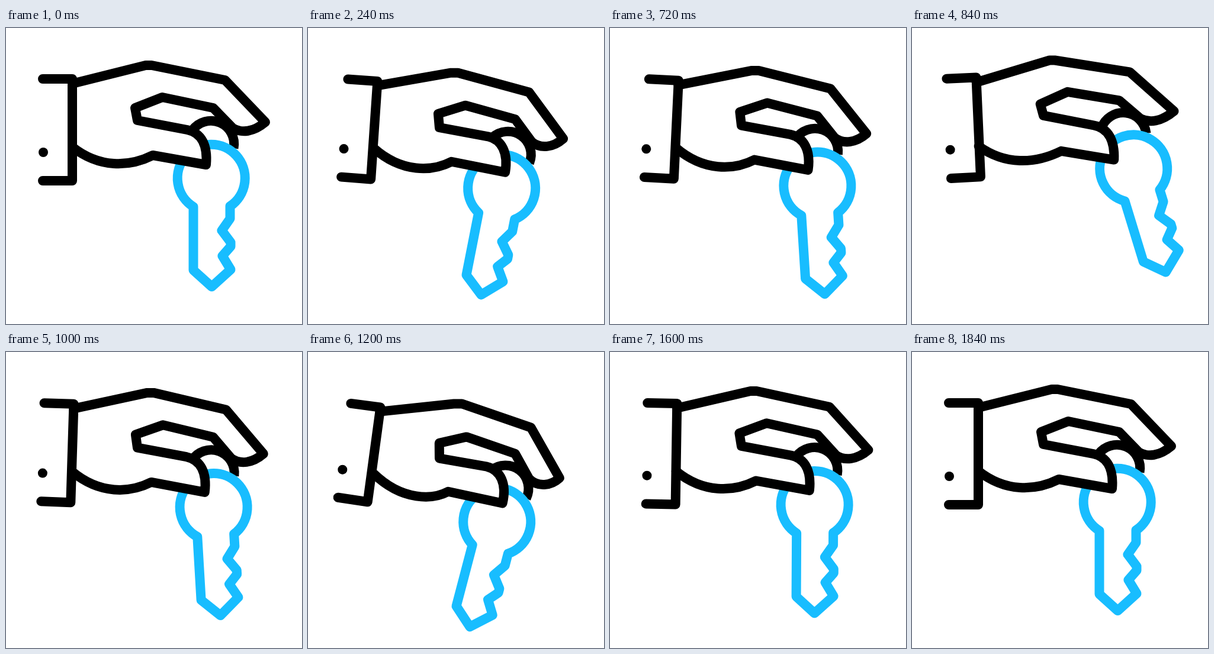
An HTML page for the animation above (2 s loop, 500 by 500 pixels).

```html
<!DOCTYPE html>
<html lang="en">
<head>
<meta charset="utf-8">
<title>Hand with a key</title>
<style>
  html, body { margin: 0; width: 100%; height: 100%; overflow: hidden; background: #fff; }
  svg { display: block; width: 100%; height: 100%; }
  path { fill: none; stroke: #000; stroke-width: 16; stroke-linecap: round; stroke-linejoin: round; }
  #hand { fill: #fff; }
  #ring { stroke-linecap: butt; }
  #blade { stroke: #18bdff; }
</style>
</head>
<body>
<svg viewBox="0 0 500 500">
  <g id="key">
    <path id="ring" d="M-32 7A39 39 0 0 1 38 37"/>
    <path id="blade" d="M-30 136V243L1 271L33 242L19 219L33 203V196L18 176L32 156V135A57 57 0 1 0 -30 136Z"/>
  </g>
  <path id="hand"/>
  <path id="cuff"/>
  <circle id="button" r="8"/>
</svg>
<script>
const LOOP = 2000;
const $ = id => document.getElementById(id);
const lerp = (a, b, k) => a + (b - a) * k;

// Matching outlines: level hand and lowered hand
const LEVEL = 'M112 94L236 63L246 63L370 88L438 159C418 176 398 178 383 169' +
  'L350 135L264 117L218 135L222 156L306 172C330 177 341 198 338 231' +
  'L248 215C208 235 158 237 112 201';
const LOWERED = 'M122 101L247 89L261 89L377 130L424 216C410 229 388 232 373 217' +
  'L350 174L268 145L222 155L222 181L302 195C325 201 336 224 328 257' +
  'L236 237C212 250 160 254 110 205';

function morph(from, to, k) {
  const ends = to.match(/\d+/g);
  let i = 0;
  return from.replace(/\d+/g, n => lerp(+n, +ends[i++], k).toFixed(2));
}

const swing = p => (1 - Math.cos(Math.PI * p)) / 2;
const settle = (a, b) => p => 1 - (1 - p ** a) ** b;
const handEase = settle(1.3, 2.6);
const keyEase = settle(1.2, 4.5);

// Each track: [time, value, easing towards this value]
const BEND = [[80, 0], [582, 1, handEase], [865, -.35, swing], [1165, 1, swing], [1840, 0, handEase]];
const TILT = [[80, 0], [550, 14.5, keyEase], [865, -17.5, swing], [1170, 16.5, swing], [1840, 0, keyEase]];

function valueAt(track, t) {
  const i = track.findIndex(k => t < k[0]);
  if (i < 1) return 0;
  const [t0, v0] = track[i - 1], [t1, v1, ease] = track[i];
  return lerp(v0, v1, ease((t - t0) / (t1 - t0)));
}

function draw(now) {
  const t = now % LOOP;
  const bend = valueAt(BEND, t);
  const at = (a, b) => lerp(a, b, bend);
  // The lower cuff shortens while the hand swings up
  const lift = t > 582 && t < 1165 ? 10 * Math.max(0, .5 - bend) : 0;

  $('hand').setAttribute('d', morph(LEVEL, LOWERED, bend));
  $('cuff').setAttribute('d',
    `M${at(62, 73)} ${at(86, 87)}L${at(112, 123)} ${at(86, 94)}` +
    `L${at(112, 100)} ${at(258, 253) - lift}L${at(62, 50)} ${at(258, 245) - lift}`);
  $('button').setAttribute('cx', at(63, 58));
  $('button').setAttribute('cy', at(210, 198) - lift);
  $('key').setAttribute('transform',
    `translate(${at(346.5, 341)} ${at(166, 204)}) rotate(${valueAt(TILT, t)})`);
}

const start = performance.now();
function tick() {
  draw(performance.now() - start);
  requestAnimationFrame(tick);
}
tick();
</script>
</body>
</html>
```
